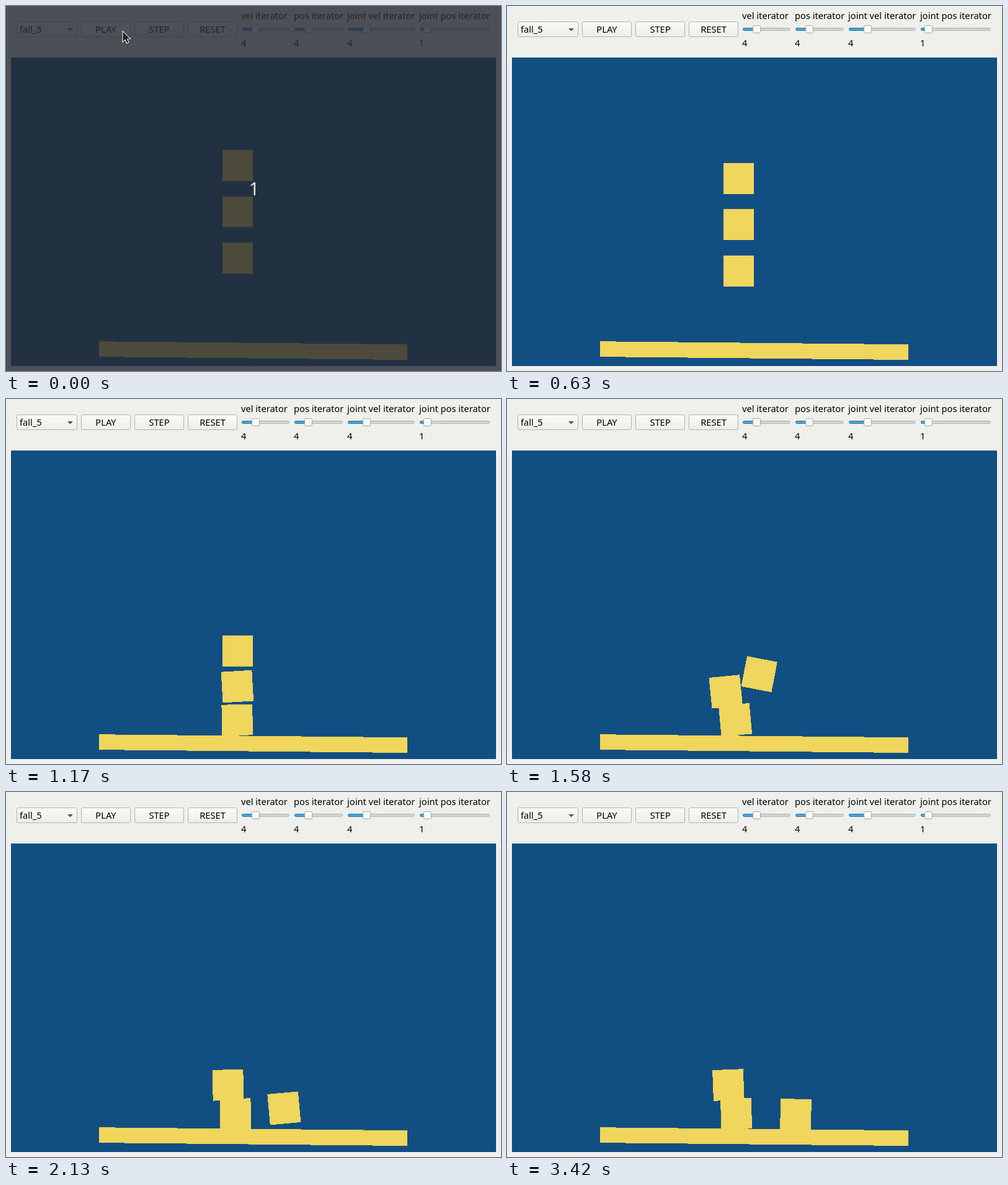
Animation of 798x588 px, one loop 3.46 s. Source, as an HTML page with a canvas:

```html
<!DOCTYPE html>
<html lang="en">
<head>
<meta charset="utf-8">
<title>Falling boxes</title>
<style>
  html, body { margin: 0; width: 100%; height: 100%; overflow: hidden; background: #efefeb; }
  canvas { display: block; }
</style>
</head>
<body>
<canvas id="stage" width="798" height="588"></canvas>
<script>
const ctx = document.getElementById('stage').getContext('2d');
const LOOP = 3460, FPS = 24, POINTER_STEPS = 11;
const BLUE = '#114e82', YELLOW = '#f0d65c', BORDER = '#b1b1ad';

// World: one metre is SIZE pixels, times are in seconds.
const SIZE = 49.7, GRAVITY = 400, COLUMN = 373.6, MIDDLE = 331.5, SPACING = 1.5 * SIZE;
const RELEASE = 0.303, STACKED = 1.14, TOP_HIT = 1.18, CORNER_HIT = 1.873, TOUCHDOWN = 2.165;
const SPIN = -196, REST_TILT = -1.7;

const toRad = degrees => degrees * Math.PI / 180;
const drop = (t, speed = 0) => speed * t + GRAVITY / 2 * t * t;

// The three boxes hang in a column; level -1 is the top one.
function fall(level, t, floor = Infinity) {
  const y = MIDDLE + level * SPACING + drop(Math.max(0, t - RELEASE));
  return { x: COLUMN, y: Math.min(y, floor), angle: 0 };
}

// The lower two boxes rock as one damped body while the upper slides left.
function stack(t) {
  const s = t - STACKED;
  const slide = Math.exp(-((s / 0.2) ** 2));
  const tilt = REST_TILT * (1 - Math.exp(-12 * s)) - 7.5 * Math.exp(-1.7 * s) * Math.sin(3.8 * s);
  const rock = tilt - REST_TILT;
  const cos = Math.cos(toRad(rock)), sin = Math.sin(toRad(rock));
  const dx = -12.6 + 12.5 * slide, dy = -46.3 - 7.8 * slide;
  const lower = {
    x: 369.6 + 0.45 * rock + 3 * slide,
    y: 518.3 + 0.4 * rock - 1.5 * slide,
    angle: tilt,
  };
  const upper = {
    x: lower.x + dx * cos - dy * sin,
    y: lower.y + dx * sin + dy * cos,
    angle: tilt - 0.4 - 1.8 * slide,
  };
  return [lower, upper];
}

// The top box spins off the stack, hops once on a corner and settles.
function tumble(t) {
  if (t < TOP_HIT) return fall(-1, t);
  if (t > TOUCHDOWN) {
    const fade = Math.exp(-8 * (t - TOUCHDOWN));
    const wobble = Math.cos(12 * (t - TOUCHDOWN));
    return { x: 465.5 - 14 * fade, y: 519.4 - 7.5 * fade, angle: 1.4 - 15 * fade * wobble };
  }
  const flight = Math.min(t, CORNER_HIT) - TOP_HIT;
  const hop = Math.max(0, t - CORNER_HIT);
  return {
    x: COLUMN + 82 * flight + 71 * hop,
    y: fall(-1, TOP_HIT).y + drop(flight) + drop(hop, -40),
    angle: SPIN * (t - TOP_HIT),
  };
}

function boxesAt(t) {
  const pair = t < STACKED ? [fall(1, t, 517.6), fall(0, t, 462)] : stack(t);
  return [...pair, tumble(t)];
}

// Fills a rotated rectangle row by row, so that its edges stay hard.
function hardRect(cx, cy, w, h, degrees) {
  const c = Math.cos(toRad(degrees)), s = Math.sin(toRad(degrees));
  const corners = [[-1, -1], [1, -1], [1, 1], [-1, 1]].map(([i, j]) =>
    [cx + (i * w * c - j * h * s) / 2, cy + (i * w * s + j * h * c) / 2]);
  const ys = corners.map(p => p[1]);
  ctx.fillStyle = YELLOW;
  for (let y = Math.floor(Math.min(...ys)); y <= Math.max(...ys); y++) {
    const row = y + 0.5, xs = [];
    corners.forEach(([x1, y1], i) => {
      const [x2, y2] = corners[(i + 1) % 4];
      if ((y1 <= row) !== (y2 <= row)) xs.push(x1 + (x2 - x1) * (row - y1) / (y2 - y1));
    });
    if (xs.length < 2) continue;
    const left = Math.round(Math.min(...xs));
    ctx.fillRect(left, y, Math.round(Math.max(...xs)) - left, 1);
  }
}

function text(str, x, y, align = 'left') {
  ctx.font = '14.67px "Noto Sans", "Open Sans", sans-serif';
  ctx.textAlign = align;
  ctx.fillStyle = '#000';
  ctx.fillText(str, x, y);
}

function panel(x, y, w, h, top, bottom, border = BORDER) {
  const fill = ctx.createLinearGradient(0, y, 0, y + h);
  fill.addColorStop(0, top);
  fill.addColorStop(1, bottom);
  ctx.beginPath();
  ctx.roundRect(x + 0.5, y + 0.5, w - 1, h - 1, 2);
  ctx.fillStyle = fill;
  ctx.fill();
  ctx.strokeStyle = border;
  ctx.lineWidth = 1;
  ctx.stroke();
}

const looks = {
  normal: ['#fbfbfa', '#ecece8'],
  hover: ['#ffffff', '#f6f6f4'],
  pressed: ['#d6d6d2', '#dadad6'],
};

function button(label, index, look = 'normal') {
  const x = 121 + 86 * index;
  panel(x, 25, 80, 25, ...looks[look]);
  text(label, x + 40, 43, 'center');
}

function slider(label, value, left, right, knob) {
  text(label, left - 1, 21);
  panel(left, 35, right - left, 5, '#c9c9c5', '#dcdcd8', '#b4b4b0');
  panel(left, 35, knob - left, 5, '#3f9fd8', '#4aaae0', '#2a78a6');
  panel(knob - 6, 31, 13, 13, '#ffffff', '#f1f1ee', '#a6a6a2');
  text(value, left - 1, 65);
}

function toolbar(playLook) {
  panel(17, 25, 98, 25, ...looks.normal);
  text('fall_5', 22, 43);
  ctx.fillStyle = '#555';
  ctx.beginPath();
  ctx.moveTo(99, 36);
  ctx.lineTo(108, 36);
  ctx.lineTo(103.5, 40.5);
  ctx.fill();
  button('PLAY', 0, playLook);
  button('STEP', 1);
  button('RESET', 2);
  slider('vel iterator', '4', 380, 457, 402);
  slider('pos iterator', '4', 465, 543, 487);
  slider('joint vel iterator', '4', 551, 659, 581);
  slider('joint pos iterator', '1', 667, 780, 679);
}

function pointer(x, y) {
  ctx.save();
  ctx.translate(x, y);
  ctx.beginPath();
  [[0, 0], [0, 15.5], [3.7, 12.3], [6.4, 18.1], [9, 16.9], [6.4, 11.2], [11.2, 10.9]]
    .forEach(p => ctx.lineTo(...p));
  ctx.closePath();
  ctx.shadowColor = 'rgba(0,0,0,.4)';
  ctx.shadowBlur = 2;
  ctx.shadowOffsetX = ctx.shadowOffsetY = 1;
  ctx.strokeStyle = '#fff';
  ctx.lineWidth = 2;
  ctx.stroke();
  ctx.shadowColor = 'transparent';
  ctx.fillStyle = '#222';
  ctx.fill();
  ctx.restore();
}

function countdown() {
  ctx.fillStyle = 'rgba(39,43,52,.81)';
  ctx.fillRect(0, 0, 798, 588);
  ctx.font = '29px "Noto Sans", "Open Sans", sans-serif';
  ctx.textAlign = 'center';
  ctx.fillStyle = '#dfe6ec';
  ctx.fillText('1', 400, 305);
}

function draw(time) {
  const step = Math.floor((Math.floor(time / 10) * 10 + 4.9) * FPS / 1000);
  const hovering = step < POINTER_STEPS;
  ctx.fillStyle = '#efefeb';
  ctx.fillRect(0, 0, 798, 588);
  ctx.fillStyle = BLUE;
  ctx.fillRect(8, 83, 782, 497);
  toolbar(step === 6 ? 'pressed' : hovering ? 'hover' : 'normal');
  hardRect(398.5, 555.15, 10 * SIZE, SIZE / 2, 0.573);
  for (const { x, y, angle } of boxesAt(step / FPS)) hardRect(x, y, SIZE, SIZE, angle);
  if (step === 0) countdown();
  if (hovering) pointer(188.5, 41.5);
}

const start = performance.now();
function tick() {
  draw((performance.now() - start) % LOOP);
  requestAnimationFrame(tick);
}
tick();
</script>
</body>
</html>
```
